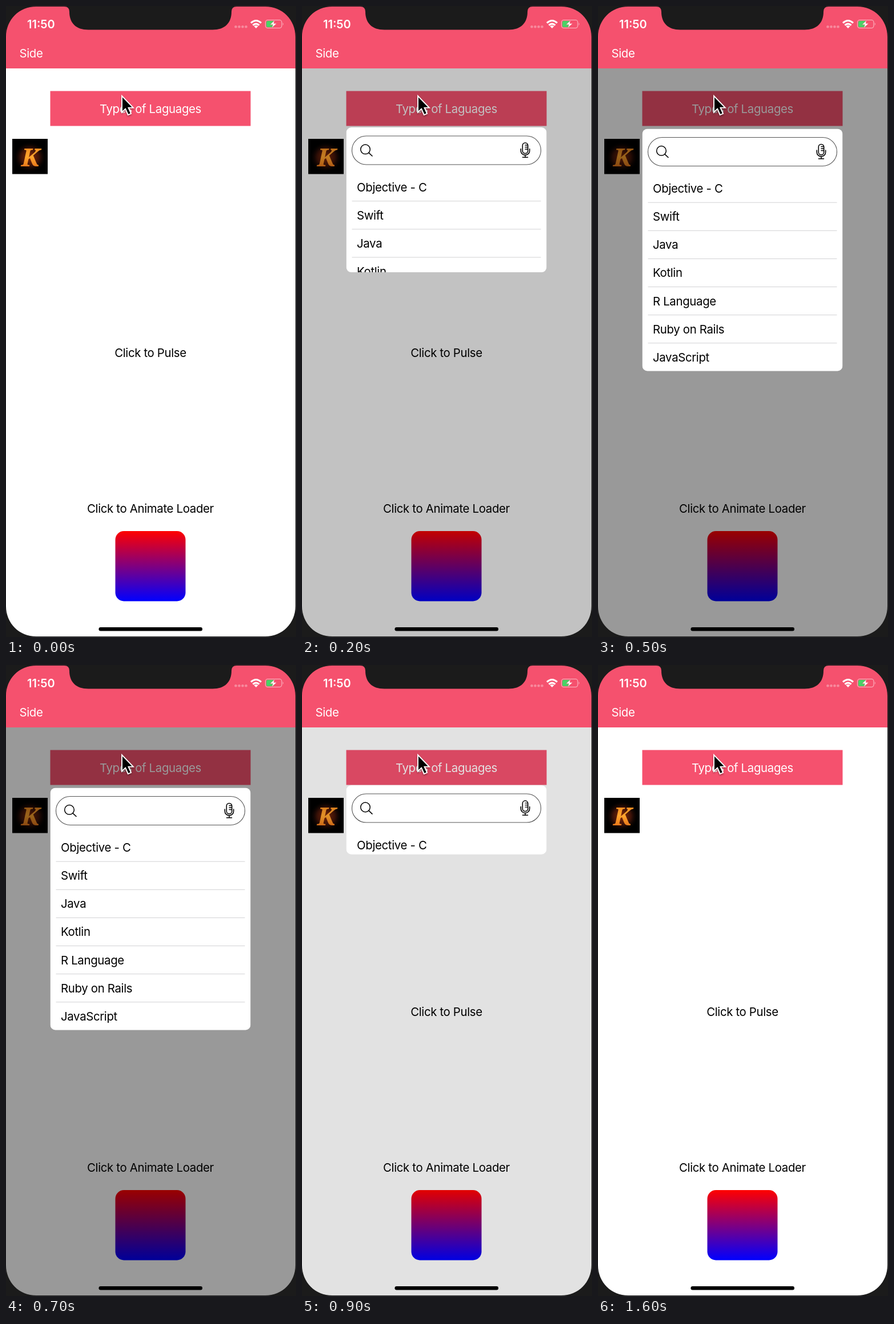
Animation, 508 px wide and 1102 px high, one loop 1.7 s. Source, as an HTML page:

```html
<!DOCTYPE html>
<html lang="en">
<head>
<meta charset="utf-8">
<title>Dropdown menu</title>
<style>
html, body { margin: 0; width: 100%; height: 100%; overflow: hidden; background: #1b1b1b; }
svg { display: block; width: 508px; height: 1102px; }
text { font: 400 20.4px Inter, "Open Sans", sans-serif; letter-spacing: -.34px; }
.mid { text-anchor: middle; }
.line { fill: none; stroke: #000; stroke-linecap: round; stroke-linejoin: round; }
</style>
</head>
<body>
<svg viewBox="0 0 508 1102" xmlns="http://www.w3.org/2000/svg">
  <defs>
    <linearGradient id="blend" x2="0" y2="1">
      <stop offset="0" stop-color="#ff0000"/>
      <stop offset="1" stop-color="#0000ff"/>
    </linearGradient>
    <linearGradient id="flame" x2="0" y2="1">
      <stop offset="0" stop-color="#e87512"/>
      <stop offset=".5" stop-color="#ffa52e"/>
      <stop offset="1" stop-color="#d8570c"/>
    </linearGradient>
    <radialGradient id="glow">
      <stop offset="0" stop-color="#8a2c08"/>
      <stop offset=".55" stop-color="#3c1208"/>
      <stop offset="1" stop-color="#000" stop-opacity="0"/>
    </radialGradient>
    <clipPath id="clip"><rect id="clipBox" x="77.5" width="351" rx="9"/></clipPath>
    <filter id="shade" x="-50%" y="-50%" width="200%" height="200%">
      <feDropShadow dx="0" dy="2" stdDeviation="1.8" flood-opacity=".35"/>
    </filter>
  </defs>

  <rect width="508" height="1102" fill="#fff"/>

  <!-- page -->
  <rect x="77.5" y="148.5" width="351" height="61" fill="#f5516e"/>
  <text class="mid" x="253" y="186.7" fill="#fff">Types of Laguages</text>
  <rect x="11" y="232" width="62" height="61.5" fill="#000"/>
  <ellipse cx="42" cy="264" rx="29" ry="27" fill="url(#glow)"/>
  <text class="mid" x="43" y="280" fill="url(#flame)" style="font:italic 700 44px 'Noto Serif','Liberation Serif',serif">K</text>
  <text class="mid" x="253" y="612.6">Click to Pulse</text>
  <text class="mid" x="253" y="884.6">Click to Animate Loader</text>
  <rect x="191.5" y="917" width="123" height="122.5" rx="15" fill="url(#blend)"/>

  <rect id="dim" y="109" width="508" height="993"/>

  <!-- dropdown -->
  <g id="menu" clip-path="url(#clip)">
    <g id="sheet">
      <rect x="77.5" width="351" height="424" fill="#fff"/>
      <rect class="line" x="87.5" y="15" width="331" height="50" rx="25" style="stroke:#555" stroke-width="1.1"/>
      <circle class="line" cx="111" cy="38.3" r="8.3" stroke-width="1.5"/>
      <path class="line" d="M117 44.3L123 50" stroke-width="1.6"/>
      <rect class="line" x="386.3" y="27" width="9.4" height="18.5" rx="4.7" stroke-width="1.6"/>
      <path class="line" d="M391 31h4M391 34.5h4M391 38h4" stroke-width="1.3"/>
      <path class="line" d="M383.3 37.5v3.2a7.7 7.7 0 0 0 15.4 0v-3.2M391 48.5v3.7M386.5 52.2h9" stroke-width="1.6"/>
      <g id="rows"></g>
    </g>
  </g>

  <!-- header and status bar -->
  <rect width="508" height="109" fill="#f5516e"/>
  <text x="23.5" y="89.8" fill="#fff">Side</text>
  <text x="37" y="38.6" fill="#fff" style="font-weight:600;font-size:20px;letter-spacing:0">11:50</text>
  <g fill="#fff" fill-opacity=".33">
    <circle cx="402.5" cy="36.3" r="2.3"/><circle cx="408.5" cy="36.3" r="2.3"/>
    <circle cx="414.5" cy="36.3" r="2.3"/><circle cx="420.5" cy="36.3" r="2.3"/>
  </g>
  <g fill="none" stroke="#fff" stroke-width="3">
    <path d="M429 29.6Q438 21.4 447 29.6"/>
    <path d="M432.4 33.5Q438 28.8 443.6 33.5"/>
  </g>
  <path d="M434.4 35.2Q438 32.6 441.6 35.2L438 38.9Z" fill="#fff"/>
  <rect x="454.5" y="24.5" width="28.5" height="14" rx="4" fill="none" stroke="#fff" stroke-opacity=".6" stroke-width="1.1"/>
  <path d="M484.8 29q2 2.5 0 5z" fill="#fff" fill-opacity=".6"/>
  <path d="M458.5 26H469V37H458.5Q456 37 456 34.5V28.5Q456 26 458.5 26Z" fill="#48d266"/>
  <path d="M470.3 25.2L462.8 32.6H467.6L465.8 38L474 30.5H469Z" fill="#fff" stroke="#f5516e" stroke-width=".5"/>

  <!-- device frame -->
  <path fill="#1b1b1b" fill-rule="evenodd" d="M0 0H508V1102H0Z
    M0 54C0 24 23 1 53 1H102Q111 1 111 10C111 30 123 41.5 144 41.5H362C383 41.5 395 30 395 10Q395 1 404 1H454C484 1 507 24 507 54
    V1048C507 1078 484 1101 454 1101H53C23 1101 0 1078 0 1048Z"/>
  <rect x="162.5" y="1085" width="181.5" height="6.5" rx="3.2"/>

  <path d="M203 157V185.5L209.2 179.6L213.8 190L219 187.8L214.5 177.6H222.8Z" stroke="#fff" stroke-width="1.9" filter="url(#shade)"/>
</svg>
<script>
const $ = id => document.getElementById(id);
const LOOP = 1700, STEP = 100, SPAN = 400;
const ROW = 49.1, FIRST = 79.6, FULL = 423;
const names = ["Objective - C", "Swift", "Java", "Kotlin", "R Language", "Ruby on Rails", "JavaScript"];

$("rows").innerHTML = names.map((name, i) => {
  const y = FIRST + i * ROW;
  const rule = i ? `<path d="M87.5 ${y}H418.5" stroke="#d2d2d4"/>` : "";
  return `${rule}<text x="96" y="${y + 32}">${name}</text>`;
}).join("");

// cubic-bezier(.42, 0, .58, 1), solved by bisection
function easeInOut(x) {
  if (x <= 0) return 0;
  if (x >= 1) return 1;
  let lo = 0, hi = 1;
  for (let i = 0; i < 24; i++) {
    const u = (lo + hi) / 2, v = 1 - u;
    const at = 1.26 * v * v * u + 1.74 * v * u * u + u * u * u;
    if (at < x) lo = u; else hi = u;
  }
  return lo * lo * (3 - 2 * lo);
}

function openness(t) {
  if (t < 100) return 0;
  if (t < 800) return easeInOut((t + 23) / SPAN);
  return 1 - easeInOut((t - 648) / SPAN);
}

function draw(ms) {
  const t = Math.floor((ms % LOOP) / STEP) * STEP;
  const p = openness(t);
  const top = 208.3 + 6.2 * p;
  $("dim").setAttribute("opacity", 0.4 * p);
  $("menu").setAttribute("visibility", p > 0 ? "visible" : "hidden");
  $("clipBox").setAttribute("y", top);
  $("clipBox").setAttribute("height", FULL * p);
  $("sheet").setAttribute("transform", `translate(0 ${top})`);
}

let start;
function tick(now) {
  start ??= now;
  draw(now - start);
  requestAnimationFrame(tick);
}
draw(0);
requestAnimationFrame(tick);
</script>
</body>
</html>
```
